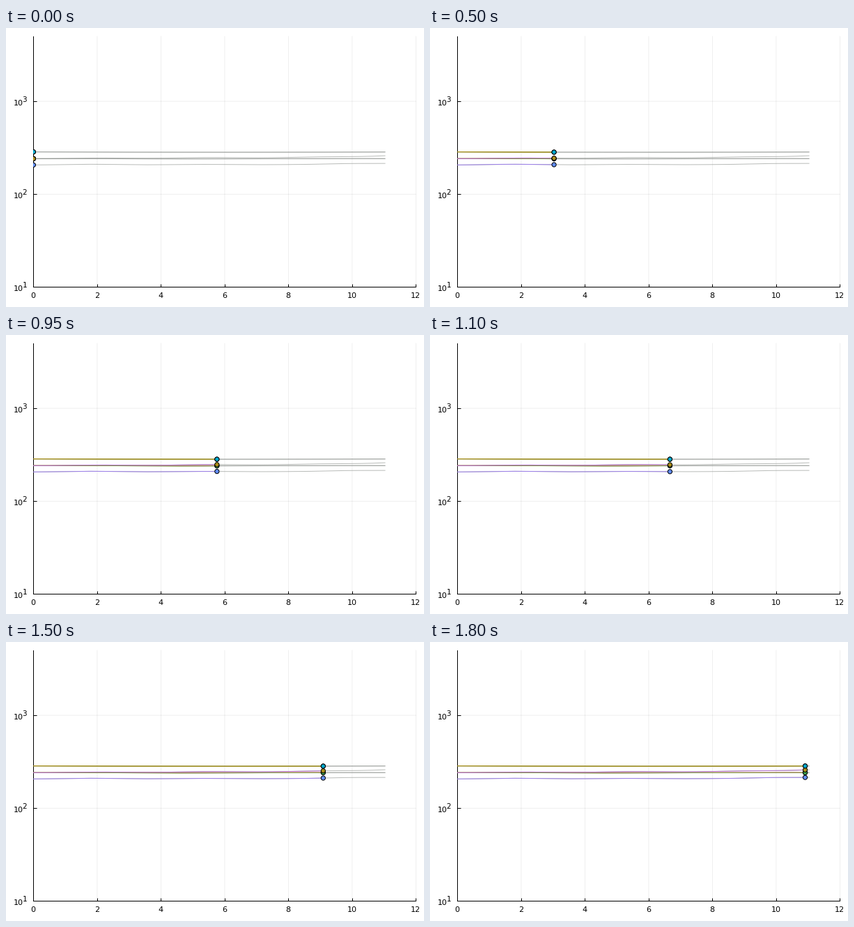
A matplotlib script for the animation above (1850 ms loop, 600 by 400 pixels).

```python
import numpy as np
import matplotlib.pyplot as plt
from matplotlib.animation import FuncAnimation

W, H, DPI = 600, 400, 100
PX = 72 / DPI
FRAMES, INTERVAL = 37, 50
STEP = 1 / 3.3
X_END = 11.03
LEFT, RIGHT, TOP, BOTTOM = 39.4, 588.4, 12, 371.4
DECADE = (BOTTOM - TOP) / np.log10(500)


def bump(x, mid, width):
    return np.exp(-((x - mid) / width) ** 2)


def rise(x, mid, speed):
    return 1 / (1 + np.exp(-speed * (x - mid)))


def top(x):
    return 282.8 + 0.06 * (x - 6) ** 2


def flat(x):
    return 241.9 + 0.4 * np.sin(x - 1)


def dip(x):
    return 241.3 - 2.8 * bump(x, 4.7, 1.8) - 0.8 * bump(x, 8.4, 1)


def climb(x):
    return 242 + 0.75 * x + 10 * (x / 11) ** 8 + 1.4 * np.sin(1.8 * (x - 4.6))


def low(x):
    fade = 2 * np.exp(-x / 6)
    return 208.4 + fade * np.sin(1.75 * (x - 0.9)) + 6.2 * rise(x, 9.3, 3)


# curve, trail colour, marker colour
SERIES = [
    (top, "#8E971E", "#00A98D"),
    (flat, "#E3605A", "#ED5E93"),
    (dip, "#7C9A45", "#3EA44E"),
    (climb, "#B573CC", "#AC8E18"),
    (low, "#9B7FE9", "#618DF6"),
    (top, "#AC8E18", "#00A9CD"),
]

fig = plt.figure(figsize=(W / DPI, H / DPI), dpi=DPI, facecolor="white")
ax = fig.add_axes([LEFT / W, 1 - BOTTOM / H,
                   (RIGHT - LEFT) / W, (BOTTOM - TOP) / H])
ax.set_yscale("log")
ax.set_xlim(0, 12)
ax.set_ylim(10, 5000)
ax.set_xticks(range(0, 13, 2))
ax.set_yticks([10, 100, 1000])
ax.minorticks_off()
ax.tick_params(direction="in", length=4.5 * PX, width=PX,
               labelbottom=False, labelleft=False)
for side in ("top", "right"):
    ax.spines[side].set_visible(False)
for side in ("left", "bottom"):
    ax.spines[side].set_linewidth(PX)


def label(x, y, text, ha="center", size=11.1):
    fig.text(x / W, 1 - y / H, text, ha=ha, va="baseline",
             family="DejaVu Sans", size=size * PX)


grid = dict(color="black", alpha=0.09, lw=0.7 * PX, snap=False,
            clip_on=False, zorder=1)
for v in range(0, 13, 2):
    ax.axvline(v, **grid)
    label(LEFT - 0.4 + v * (RIGHT - LEFT) / 12, 387, str(v))
for p in (1, 2, 3):
    ax.axhline(10 ** p, **grid)
    y = BOTTOM - (p - 1) * DECADE
    label(11, y + 6, "10", "left")
    label(23.6, y + 1, str(p), "left", 10.4)

xs = np.linspace(0, X_END, 400)
for curve, _, _ in SERIES:
    ax.plot(xs, curve(xs), color="#808580", alpha=0.55, lw=PX, zorder=2)

trails = [ax.plot([], [], color=c, lw=PX, zorder=3)[0] for _, c, _ in SERIES]
dots = ax.scatter(np.zeros(len(SERIES)), [f(0) for f, _, _ in SERIES],
                  s=(6.2 * PX) ** 2, c=[m for _, _, m in SERIES],
                  edgecolors="black", linewidths=PX, zorder=4)


def update(i):
    x = i * STEP
    path = np.append(xs[xs < x], x)
    for (curve, _, _), trail in zip(SERIES, trails):
        trail.set_data(path, curve(path))
    dots.set_offsets([(x, curve(x)) for curve, _, _ in SERIES])
    return [*trails, dots]


anim = FuncAnimation(fig, update, frames=FRAMES, interval=INTERVAL,
                     repeat=True, repeat_delay=0)
plt.show()
```
